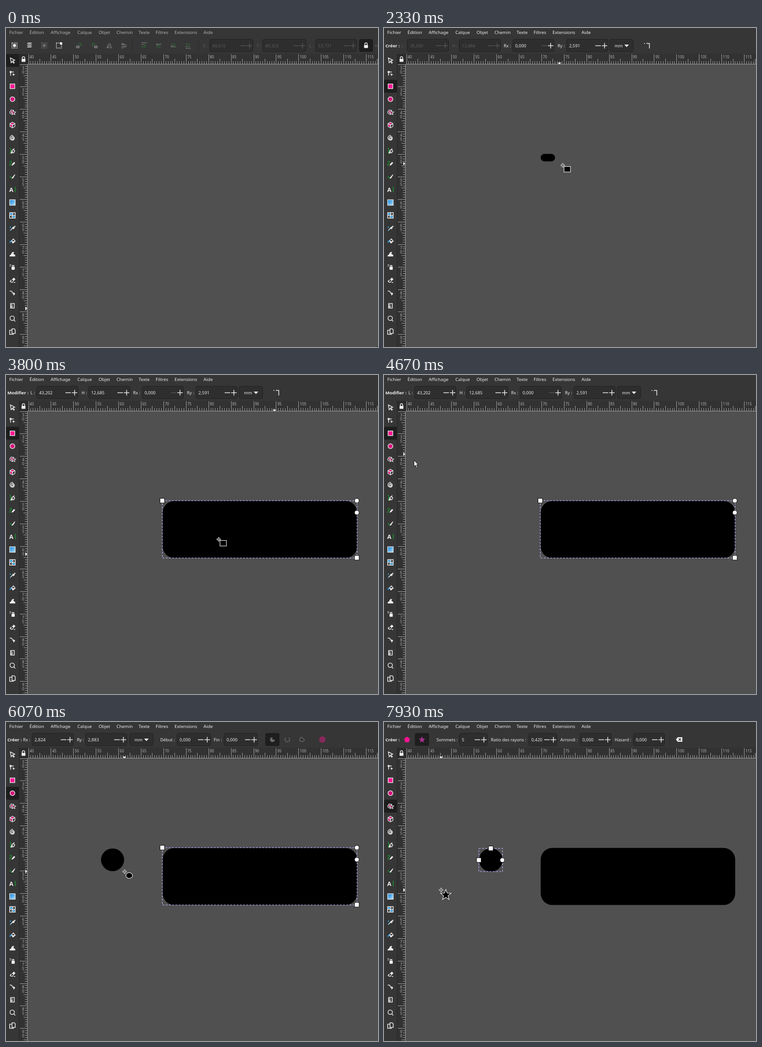
These frames come from a looping animation (808 px wide and 693 px high, 8000 ms). An HTML page:

```html
<!DOCTYPE html>
<html lang="fr">
<head>
<meta charset="utf-8">
<title>Dessin de formes</title>
<style>
html, body { margin: 0; width: 100%; height: 100%; overflow: hidden; background: #505050; }
svg { display: block; width: 808px; height: 693px; }
text { font: 9.3px "Noto Sans", sans-serif; fill: #eee; white-space: pre; }
text.bold { font-size: 9.6px; font-weight: 700; }
text.letter { font-size: 13px; font-weight: 700; }
text.menu { font-size: 9.7px; fill: inherit; }
text.ruler { font-size: 8px; fill: #b4b4b4; }
text.dim { fill: #5c5c5c; }
.w { fill: #eee; }
.l { fill: none; stroke: #eee; stroke-width: 1.5; }
.p { fill: #ff1493; }
.pl { fill: #ff1493; stroke: #eee; stroke-width: 1.4; }
.po { fill: #363636; stroke: #eee; stroke-width: 1.2; }
.g { fill: none; stroke: #169a2c; stroke-width: 1.5; }
.b { fill: #2ba3ee; }
.d { fill: #6c6c6c; }
.dl { fill: none; stroke: #6c6c6c; stroke-width: 1.4; }
.off { fill: none; stroke: #565656; stroke-width: 1.4; }
.gd { fill: none; stroke: #2c6135; stroke-width: 2; }
.entry { fill: #2e2e2e; stroke: #212121; }
.on { fill: #1e1e1e; }
.bar { fill: #323232; }
.sep { stroke: #2a2a2a; }
.handle { fill: #fff; stroke: #000; }
.frame { fill: none; stroke: #d0ccff; stroke-dasharray: 4 3; }
.under { fill: none; stroke: #4444a8; stroke-opacity: .55; }
</style>
</head>
<body>
<svg id="stage" viewBox="0 0 808 693"></svg>
<script>
const LOOP = 8000, MM = 9.78;

// ---------- markup helpers ----------
const path = (cls, d) => `<path class="${cls}" d="${d}"/>`;
const rect = (cls, x, y, w, h, r = 0) =>
  `<rect class="${cls}" x="${x}" y="${y}" width="${w}" height="${h}" rx="${r}"/>`;
const dot = (cls, x, y, r) => `<circle class="${cls}" cx="${x}" cy="${y}" r="${r}"/>`;
const text = (x, y, s, cls = '') => `<text x="${x}" y="${y}" class="${cls}">${s}</text>`;
const at = (x, y, body) => `<g transform="translate(${x} ${y})">${body}</g>`;
const group = (id, body) => `<g id="${id}">${body}</g>`;

// A regular polygon, or a star when the inner radius differs.
function polygon(points, outer, inner = outer) {
  const n = inner === outer ? points : points * 2;
  return 'M' + Array.from({ length: n }, (_, i) => {
    const r = i % 2 ? inner : outer, a = i * 2 * Math.PI / n - Math.PI / 2;
    return `${(r * Math.cos(a)).toFixed(2)} ${(r * Math.sin(a)).toFixed(2)}`;
  }).join('L') + 'Z';
}

const padlock = rect('w', -4.2, -1, 8.4, 6.5, 1) + path('l', 'M-2.6-1V-3.2a2.6 2.6 0 0 1 5.2 0V-1');

// ---------- tool column ----------
const tools = [
  path('l', 'M-4.5-5.5 5-.7 1 .9 4.2 4.6 2.8 6-.6 2.2-2.8 5Z'),
  rect('w', -6, -5, 4, 4) + path('l', 'M-4-1V5M-2-3H3') + path('w', 'M0 0 6 2.6 3.3 3.4 2 6Z'),
  rect('pl', -5, -5, 10, 10),
  `<circle r="5.2" class="pl" style="fill:#d6157c"/>`,
  path('po', 'M-6 0-3-4.5 2-4 3 1-2 4-5 3Z') + path('p', 'M-4 0-2.5-3 0-2.6-1 1-3 2Z')
    + at(2.3, 1.3, path('po', polygon(5, 5, 2.4)) + dot('p', 0, 0, 1.4)),
  path('po', polygon(6, 6.3)) + path('p', 'M-4.4-1.6-1 .3V4.4L-4.4 2.4ZM0-5 3.6-3 0-1-3.6-3Z')
    + path('l', 'M-5.4-3 0 0 5.4-3M0 0V6'),
  path('l', 'M0 .5a1.3 1.3 0 0 1 1.5-1.5A2.4 2.4 0 1 1-2.5 .5 3.8 3.8 0 0 1 1.5-3.4 4.2 4.2 0 1 1-2 4.6Q-5.5 3-5.3-1A5.6 5.6 0 0 1 1-5.4'),
  path('g', 'M-6-6C-1-6-6 2-4 6') + path('l', 'M-3 5-1-1 2-3 5 0 3 4Z') + path('l', 'M-3 5 1 1M2-3 4-5'),
  path('g', 'M-6-4C-3-7 0-4-3-2S-6 2-5 5') + path('w', 'M-2 4-1 1 3.5-4 6-1.6 1.4 3Z'),
  path('g', 'M-6 0C-3-2-4 5 0 4') + path('w', 'M-2 3 5-5 6-4 1 4Z'),
  text(-7, 4.5, 'A', 'letter') + path('g', 'M6-6V6'),
  `<rect x="-6" y="-6" width="12" height="12" fill="url(#blue)" stroke="#eee" stroke-width="1.3"/>`,
  rect('l', -6, -6, 12, 12) + path('b', 'M-5-5H-1.6Q1-2-1-.6-3 0-5-.6ZM.6.6Q3 0 5 1.6V5H1.6Q-1 2 .6.6Z')
    + path('l', 'M-6 1Q-2-2 0 0T6-1M-1-6Q3-2 0 0T1 6'),
  path('w', 'M-1-1 2-4 3-3 5-6 7-4 4-2 5-1 2 2Z') + path('l', 'M0 0-4 4') + path('b', 'M-4.5-5Q-2-1.5-4.5-1T-4.5-5ZM-6 6-5 3-3 5Z'),
  path('l', 'M-2-1 2-5 6 0 1 4Z') + path('w', 'M-2 0 6 0 1 4.5Z') + path('b', 'M-6 4Q-7 0-3-2L-2 1Z'),
  path('w', 'M-6 5V2Q-3 2-2-2 0-6 4-4 1-2 3 0 5 2 6 1V5Z'),
  rect('w', -2, -1, 7, 7, 1) + rect('w', -1, -4, 5, 2) + path('l', 'M-6-5h2M-6-2h2M-3-4h1'),
  path('w', 'M-1-1 3-5 6.5-1.5 2.5 2.5Z') + path('l', 'M-2 0-5 3-3 5H0L2 3M3 5.5H6'),
  path('l', 'M-6-4H-3C1-4-2 2 3 2') + path('w', 'M2-2 6 2 2 6Z'),
  path('l', 'M-4-5H4V5H-4Z') + path('l', 'M-4-2H0M-4 1H1M-4 3H0'),
  `<circle class="l" cx="-.5" cy="-1" r="4.8"/>` + path('l', 'M3 2.5 6 6'),
  path('l', 'M-1-6H4L6-4V4H-1ZM-1-3H-6V6H2V4'),
].map((icon, i) => at(14, 70.5 + 28.05 * i, icon)).join('');

// ---------- rulers ----------
function rulers() {
  let ticks = '', labels = '';
  for (let i = 0; i < 160; i++) {
    const x = 48.5 + i * MM / 2, y = 78.5 + i * MM / 2;
    const long = i % 10 === 0, half = i % 5 === 0;
    ticks += `M${Math.round(x) + .5} ${long ? 57 : half ? 67 : 72}V78`;
    ticks += `M${long ? 30 : half ? 38 : 41} ${Math.round(y) + .5}H46`;
    if (!long) continue;
    labels += text(x + 3, 66, 40 + i / 2, 'ruler');
    [...String(30 + i / 2)].forEach((c, k) => labels += text(35, y + 11 + 9 * k, c, 'ruler'));
  }
  return rect('bar', 28, 56, 780, 23) + rect('bar', 28, 56, 18, 637)
    + `<path d="${ticks}M46 78.5H808M46.5 78V693" stroke="#a4a4a4" fill="none"/>` + labels
    + `<rect x="29" y="56" width="18" height="23" fill="#2b2b2b"/>` + at(38, 68, padlock);
}

// ---------- option bars ----------
const label = (x, s, cls) => text(x, 41.5, s, cls);
function field(name, nameX, x, w, value, { off, noMinus } = {}) {
  const cls = off ? 'dim' : '', m = x + w - 22, p = x + w - 8;
  return label(nameX, name + ' :', cls) + rect('entry', x + .5, 24.5, w - 1, 27, 4) + label(x + 6, value, cls)
    + path(off || noMinus ? 'off' : 'l', `M${m - 6} 38.5h12`)
    + path(off ? 'off' : 'l', `M${p - 6} 38.5h12M${p} 32.5v12`);
}
const unit = x => rect('entry', x + .5, 24.5, 51, 27, 4) + label(x + 11, 'mm') + path('w', `M${x + 32} 36h10l-5 5.5z`);

function selectBar() {
  const off = { off: true };
  const layers = [-5, -1, 3].map(y => path('w', `M-6 ${y + 1}L-3 ${y - 1}H6L3 ${y + 1}Z`)).join('');
  const marquee = `<rect class="l" stroke-dasharray="2 1.5" x="-5.5" y="-5.5" width="11" height="11"/>`;
  const turn = path('d', 'M-7 0H1V6H-7Z') + path('gd', 'M-2-4H4V2');
  const flip = path('d', 'M-1-6V6H-6Z') + path('dl', 'M1.5-5V5H6Z');
  const order = [[-6, 1], [-3, 1], [3, -1], [6, -1]].map(([y, s], i) =>
    at(300 + 32 * i, 38, path('dl', `M-6 ${y}H6M-6 ${y / 3}H0`) + path('gd', `M2 ${5 * s}V${-4 * s}M-6 ${3 * s}H-1`))).join('');
  return at(18.5, 38, marquee + dot('w', 0, 0, 3.4)) + at(51, 38, layers)
    + at(83, 38, `<g opacity=".3">${marquee + dot('w', 0, 0, 3.4)}</g>`)
    + at(115, 38, marquee + rect('w', 2, -7, 5, 5))
    + at(159, 38, turn) + `<g transform="translate(192 38) scale(-1 1)">${turn}</g>`
    + at(224, 38, flip) + `<g transform="translate(257 38) rotate(90)">${flip}</g>` + order
    + path('sep', 'M274.5 26V50M418.5 26V50')
    + field('X', 428, 442, 95, '49,616', off) + field('Y', 544, 557, 95, '49,323', off)
    + field('L', 659, 672, 90, '53,731', off)
    + rect('on', 767, 24, 30, 28, 4) + at(782, 38, padlock) + label(801, 'H', 'dim');
}

function rectBar(title, dx, width, height, off) {
  return label(3, title, 'bold')
    + field('L', 37 + dx, 50 + dx, 91, width, { off }) + field('H', 148 + dx, 163 + dx, 91, height, { off })
    + field('Rx', 260 + dx, 279 + dx, 91, '0,000', { noMinus: true }) + field('Ry', 377 + dx, 396 + dx, 91, '2,591')
    + unit(490 + dx) + path('l', `M${570 + dx} 33.5h6.5v11`) + path('l', `M${565 + dx} 33.5h2`);
}

function ellipseBar(title, dx, rx, ry) {
  return label(3, title, 'bold') + at(dx, 0,
    field('Rx', 37, 56, 91, rx) + field('Ry', 154, 172, 91, ry) + unit(268)
    + field('Début', 335, 371, 74, '0,000') + field('Fin', 451, 473, 74, '0,000')
    + rect('on', 563, 24, 31, 28, 4) + path('d', 'M578.5 38V33A5.3 5.3 0 1 0 584 38.5Z')
    + path('dl', 'M608 34A5 5 0 1 0 614 34') + path('dl', 'M639 34Q643 32 645 36 650 38 647 41 642 45 638 40Z')
    + `<circle cx="687" cy="38" r="7" fill="#87285b"/>`);
}

const starBar = () => label(3, 'Créer :', 'bold') + at(50, 38.5, path('p', polygon(5, 6.7)))
  + rect('on', 67, 24, 31, 28, 4) + at(82.5, 38.5, `<path d="${polygon(5, 7.5, 3.5)}" fill="#a0308c"/>`)
  + field('Sommets', 114, 163, 62, '5') + field('Ratio des rayons', 232, 314, 62, '0,420')
  + field('Arrondi', 383, 425, 69, '0,000') + field('Hasard', 501, 541, 69, '0,000')
  + path('sep', 'M620.5 26V50')
  + path('w', 'M634 38l4-5h10v10h-10z') + `<path d="M640 35.5l5 5m0-5l-5 5" stroke="#333" stroke-width="1.5"/>`;

const bars = [
  selectBar(),
  rectBar('Créer :', 0, '38,500', '13,484', true),
  rectBar('Modifier :', 16, '43,202', '12,685', false),
  ellipseBar('Créer :', 0, '2,824', '2,883'),
  ellipseBar('Modifier :', 16, '2,617', '2,573'),
  starBar(),
].map((body, i) => group('bar' + i, body)).join('');

const menu = Object.entries({
  Fichier: 7, Édition: 51, Affichage: 97, Calque: 155, Objet: 201, Chemin: 240,
  Texte: 288, Filtres: 325, Extensions: 366, Aide: 429,
}).map(([name, x]) => text(x, 13, name, 'menu')).join('');

// ---------- handles and pointers ----------
const square = (x, y) => rect('handle', x - 5, y - 5, 10, 10);
const frame = (x, y, w, h) => rect('under', x, y, w, h) + rect('frame', x, y, w, h);
const cross = `<path d="M-4.5 0H4.5M0-4.5V4.5" stroke="#d8d8d8" stroke-width="3"/>
  <path d="M-3.5 0H3.5M0-3.5V3.5" stroke="#333"/>`;
const tip = 'fill="#000" stroke="#fff" stroke-width="1.1"';
const pointers = [
  `<path d="M.5 .5V14L3.6 11.2 6 17 8.2 16 5.8 10.4H9.5Z" fill="#fff" stroke="#000" stroke-width=".9"/>`,
  cross + `<rect x="2.8" y="2.5" width="14" height="12" ${tip}/>`,
  cross + `<ellipse cx="10" cy="8.5" rx="7.2" ry="6.2" ${tip}/>`,
  cross + at(10.3, 10.8, `<path d="${polygon(5, 12, 5)}" ${tip}/>`),
].map((body, i) => group('pointer' + i, body)).join('');

document.getElementById('stage').innerHTML = `
  <defs><linearGradient id="blue" x2="1" y2="1"><stop stop-color="#1685d8"/><stop offset="1" stop-color="#a8dcff"/></linearGradient></defs>
  <rect width="808" height="693" fill="#505050"/>
  <rect id="box" x="340.3" y="273.6"/><ellipse id="oval"/>
  ${group('boxHandles', frame(339.5, 273, 423, 124.5) + square(339.5, 273) + square(762, 397)
    + dot('handle', 762, 273, 5) + dot('handle', 762, 299, 5))}
  ${group('ovalHandles', frame(206, 274.5, 51.5, 50.5) + square(206, 300) + square(232, 274.5) + dot('handle', 257, 300, 5))}
  <rect width="808" height="57" fill="#363636"/><rect width="28" height="693" fill="#363636"/>
  ${rulers()}
  <path d="M28.5 56V693" stroke="#262626"/>
  <path id="markX" class="w" d="M-4 75H4L0 79Z"/><path id="markY" class="w" d="M42-4V4L46 0Z"/>
  <rect id="active" class="on" width="28" height="28" rx="3"/>
  ${tools}${group('menu', menu)}${bars}${group('pointer', pointers)}`;

// ---------- motion ----------
const route = [ // time, x, y
  [-30, 830, 609], [0, 806, 691], [70, 790, 676], [200, 700, 600], [400, 480, 430], [650, 200, 210], [830, 46, 98],
  [930, 19, 92], [1130, 13, 113], [1270, 16, 112], [1400, 90, 150], [1670, 404, 303], [1800, 408, 318],
  [2130, 340.3, 273.6], [2400, 405, 307], [2660, 607, 376], [2730, 677, 389], [2930, 766, 399],
  [3270, 762.8, 397.6], [3600, 762.8, 397.6], [3730, 690, 400], [3770, 583, 389], [3800, 462, 357],
  [4000, 180, 235], [4250, 46, 172], [4330, 16, 152], [4530, 16, 152], [4800, 110, 215],
  [5200, 206.4, 274.7], [5400, 230, 301], [5470, 239, 310], [5700, 252, 320], [6070, 257.6, 325],
  [6530, 257.6, 325], [6730, 170, 285], [6860, 60, 235], [6930, 46, 227], [7330, 14, 178],
  [7400, 18, 184], [7600, 65, 340], [7730, 95, 395], [7860, 124, 365], [8000, 124, 365],
];
const stalls = [[830, 1800], [4250, 4930], [6930, 7730]]; // pointer in tool column, rulers idle
const barTimes = [0, 1800, 3600, 4930, 6530, 7730];
const toolOfBar = [0, 2, 2, 3, 3, 4];

function position(t) {
  const i = Math.max(1, route.findIndex(k => k[0] >= t));
  const [t0, x0, y0] = route[i - 1], [t1, x1, y1] = route[i];
  const f = Math.max(0, (t - t0) / (t1 - t0));
  return [x0 + (x1 - x0) * f, y0 + (y1 - y0) * f];
}

const get = id => document.getElementById(id);
const show = (id, on) => get(id).style.display = on ? '' : 'none';
const set = (id, attrs) => { for (const k in attrs) get(id).setAttribute(k, attrs[k]); };

function draw(t) {
  const bar = barTimes.filter(s => s <= t).length - 1, tool = toolOfBar[bar];
  const stall = stalls.find(([a, b]) => t > a && t < b);
  // Ruler marks trail the pointer by 30 ms, dragged shapes by 70 ms.
  const [x, y] = position(t), [mx, my] = position(stall ? stall[0] : t - 30);

  barTimes.forEach((_, i) => show('bar' + i, i === bar));
  set('menu', { fill: bar ? '#eee' : '#b2b2b2' });
  set('active', { y: 56.5 + 28.05 * tool });

  const [bx, by] = position(Math.min(t - 70, 3600)), w = Math.max(0, bx - 340.3), h = Math.max(0, by - 273.6);
  show('box', t > 2200);
  set('box', { width: w, height: h, rx: Math.min(25.3, w / 2, h / 2) });

  const [ox, oy] = position(Math.min(t - 70, 6530));
  show('oval', t > 5270);
  set('oval', { cx: (206.4 + ox) / 2, cy: (274.7 + oy) / 2,
    rx: Math.max(0, ox - 206.4) / 2, ry: Math.max(0, oy - 274.7) / 2 });
  show('boxHandles', t >= 3600 && t < 6530);
  show('ovalHandles', t >= 6530);

  show('markX', mx > 46);
  set('markX', { transform: `translate(${mx} 0)` });
  set('markY', { transform: `translate(0 ${my})` });
  const shape = stall ? 0 : Math.max(0, tool - 1);
  for (let i = 0; i < 4; i++) show('pointer' + i, i === shape);
  set('pointer', { transform: `translate(${x} ${y})` });
}

// The screen is refreshed 15 times a second, on 10 ms boundaries.
function tick(now) {
  const step = Math.floor((now % LOOP + 5) * 15 / 1000) % 120;
  draw(Math.round(step * 100 / 15) * 10);
  requestAnimationFrame(tick);
}
draw(0);
requestAnimationFrame(tick);
</script>
</body>
</html>
```
